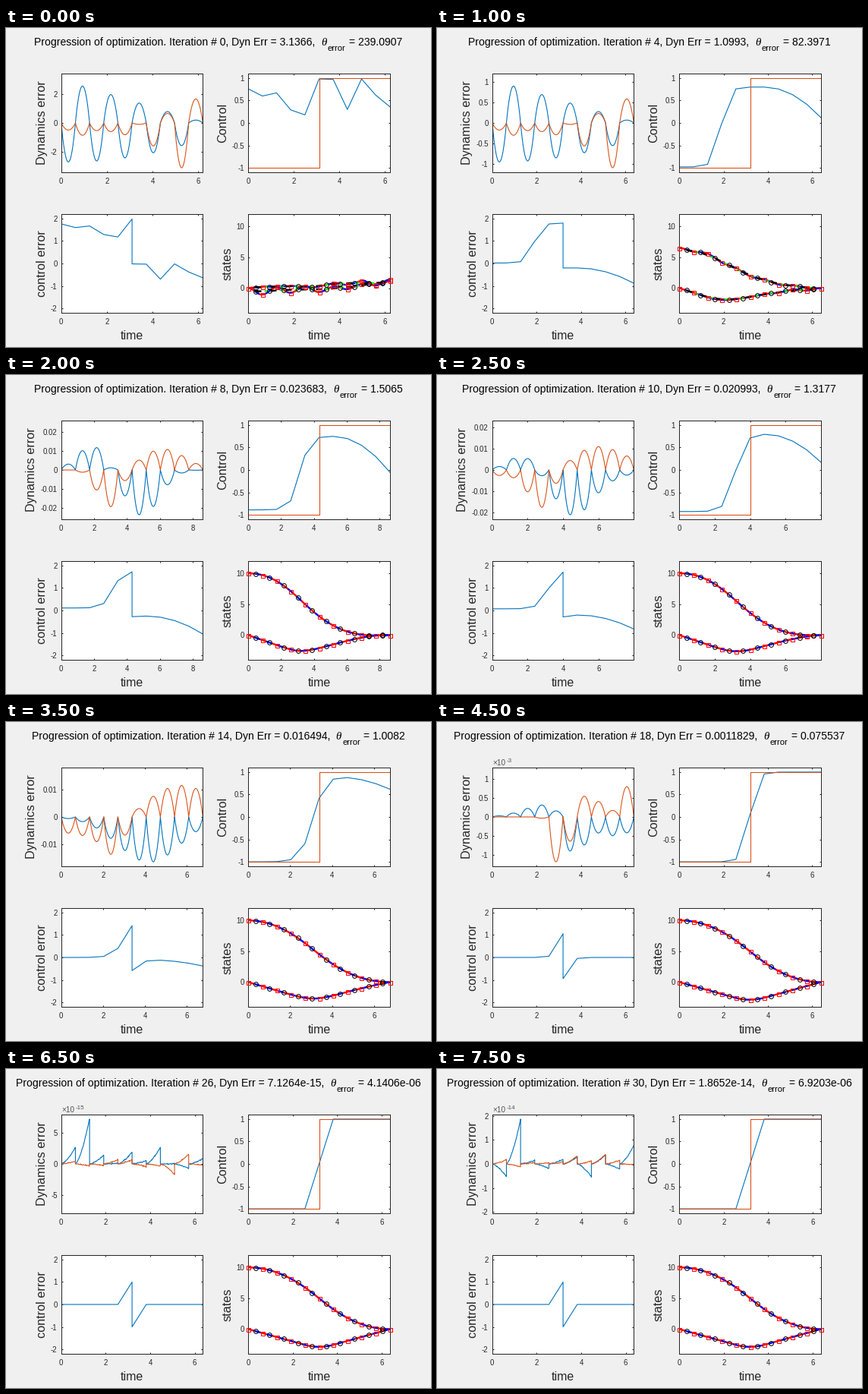
These frames come from a looping animation (560x420 px, 8 s). A matplotlib script:

```python
import numpy as np
import matplotlib.pyplot as plt
from matplotlib.animation import FuncAnimation

W, H, DPI = 560, 420, 80
PX = 72 / DPI  # points per pixel
BLUE, ORANGE, INK = "#0072BD", "#D95319", "#262626"
STEPS, SEGS, SUB = 16, 10, 30

plt.rcParams.update({
    "font.family": "Liberation Sans",
    "axes.unicode_minus": False,
    "path.simplify": False,
})

# Convergence: step, dynamics error, angle error (geometric in between)
CONVERGENCE = np.array([
    (0, 3.1366, 239.0907), (2, 1.0993, 82.3971), (4, .023683, 1.5065),
    (7, .016494, 1.0082), (9, .0011829, .075537), (11, 5.6518e-8, 3.0705e-6),
    (13, 7.1264e-15, 4.1406e-6), (15, 1.8652e-14, 6.9203e-6),
])
# Smooth switch: step, final time, low, high, centre, softness, droop at the end
SWITCH = np.array([
    (2, 6.39, -.98, .8, 2.95, .28, .68), (4, 8.62, -.89, .75, 3.65, .33, .8),
    (7, 6.757, -1, .9, 4.55, .42, .28), (9, 6.39, -1, 1, 4.97, .27, 0),
    (11, 6.367, -1, 1, 5, .05, 0),
])
GUESS = np.array([.76, .6, .67, .29, .18, .98, .97, .3, .98, .62, .36])
GUESS_TIME = 6.21

U = np.linspace(0, 1, SUB + 1)
SEG = np.arange(SEGS)
GRID = (SEG[:, None] + U).ravel() / SEGS


def bumps(*specs):
    return sum(a * np.exp(-((SEG - c) / w) ** 2 / 2) for a, c, w in specs)


def first_peaks():
    even = SEG % 2 == 0
    return (np.where(even, -2.75 + .018 * SEG ** 2, 2.9 - .3 * SEG),
            np.where(even, -.5 - .0052 * SEG ** 3, -.9 + .032 * SEG ** 2))


# Error peak of each segment (position, velocity) as sums of bumps
PEAK_AT = [0, 2, 4, 7, 9, 11]
PEAKS = [
    first_peaks(),
    first_peaks(),
    (bumps((1.3, 1.7, 1), (-2.4, 5.2, 1.2)),
     bumps((-2, 2.9, .8), (1.1, 6.7, 1.5))),
    (bumps((-1.65, 5.7, 2.2)),
     bumps((-.65, .7, 1.6), (-1.25, 3.2, .85), (1.15, 8, 2.2))),
    (bumps((.33, 3.3, 1.5), (-1.1, 5.3, .6), (-.5, 8, 1.7)),
     bumps((-1.65, 4.4, .5), (.6, 6.3, .8), (.8, 9, .5))),
    (bumps((.4, 2.3, 1), (-5.35, 5, .4)),
     bumps((-5.65, 4, .4), (5.65, 6, .4))),
]
PEAKS = np.array([np.array(p) / np.abs(p).max() for p in PEAKS])


def track(table, k):
    return [np.interp(k, table[:, 0], col) for col in table[:, 1:].T]


def integrate(t, f, start):
    return start + np.append(0, np.cumsum(np.diff(t) * (f[1:] + f[:-1]) / 2))


def error_curves(k, size):
    if k < 13:
        peaks = [[np.interp(k, PEAK_AT, col) for col in part.T]
                 for part in PEAKS.transpose(1, 0, 2)]
        pair = np.array([np.outer(p, 4 * U * (1 - U)).ravel() for p in peaks])
    else:  # rounding noise drifts within each segment
        rng = np.random.default_rng(k)
        ends = rng.normal(0, 1, (2, SEGS)) * [[.2], [.13]]
        ends[0, 1] = 1
        curve = ends[:, :, None] * U ** 1.5
        pair = (curve + rng.normal(0, .006, curve.shape)).reshape(2, -1)
    return pair * size / np.abs(pair).max()


def control(k):
    tf, low, high, centre, soft, droop = track(SWITCH, k)
    i = np.arange(SEGS + 1)
    u = low + (high - low) / (1 + np.exp((centre - i) / soft))
    u -= droop * (np.maximum(i - 6, 0) / 4) ** 2
    mix = min(k / 2, 1)
    return GUESS_TIME + mix * (tf - GUESS_TIME), GUESS + mix * (u - GUESS)


def solve(k, size):
    tf, knots = control(k)
    t = GRID * tf
    e_pos, e_vel = error_curves(k, size)
    u = np.interp(GRID, np.linspace(0, 1, SEGS + 1), knots)
    settle = min(k / 2, 1) * GRID  # pulls the end state to rest
    v = integrate(t, u + e_vel, 0)
    v -= v[-1] * settle
    x = integrate(t, v + e_pos, np.interp(k, [0, 2, 4], [0, 6.5, 10]))
    x -= x[-1] * settle
    return tf, t, e_pos, e_vel, knots, x, v


fig = plt.figure(figsize=(W / DPI, H / DPI), dpi=DPI, facecolor="#F0F0F0")


def panel(left, top):
    return fig.add_axes([left / W, 1 - (top + 130) / H, 186.6 / W, 130 / H])


ax_err, ax_ctl, ax_dif, ax_sta = [panel(x, y) for y in (60, 245) for x in (72.8, 319.2)]
texts = []


def write(x, y, s, size, color=INK, **kw):
    item = fig.text(x / W, 1 - y / H, s, fontsize=size * PX, color=color, **kw)
    texts.append(item)
    return item


def text_width(s, size):
    return size * sum({"-": .333, ".": .278}.get(c, .556) for c in s)


def number(v):
    digits = max(int(np.floor(np.log10(v))) + 5, 5)
    return f"{v:.{digits}g}"


def dress(ax, tf, lim, ticks, name, unit=1.0, foot=False):
    box = ax.get_position()
    left, mid = box.x0 * W, H * (1 - (box.y0 + box.y1) / 2)
    labels = [f"{round(v / unit, 6) + 0:g}" for v in ticks]
    times = np.arange(0, tf, 2)
    ax.set_xlim(0, tf)
    ax.set_ylim(*lim)
    ax.set_xticks(times, [f"{v:g}" for v in times])
    ax.set_yticks(ticks, labels)
    ax.tick_params(direction="in", top=True, right=True, length=2 * PX,
                   width=PX, color=INK, labelcolor=INK, labelsize=9.6 * PX)
    ax.tick_params(axis="x", pad=7.5 * PX)
    ax.tick_params(axis="y", pad=5.2 * PX)
    for side in ax.spines.values():
        side.set(linewidth=PX, color=INK)
    widest = max(text_width(s, 10) for s in labels)
    write(left - 11.6 - widest, mid, name, 16.3, rotation=90,
          rotation_mode="anchor", ha="center", va="baseline")
    if foot:
        write(left + 93.5, 410, "time", 16, ha="center", va="baseline")


def error_ticks(lim):
    decade = np.floor(np.log10(lim))
    steps = [m * 10 ** (decade + d) for d in (-1, 0) for m in (1, 2, 5)]
    step = next(s for s in steps if lim / s < 3)
    n = int(lim / step)
    ticks = step * np.arange(-n, n + 1)
    exp = int(np.floor(np.log10(ticks[-1]) + 1e-9)) if lim < .01 else 0
    return ticks, exp


def heading(k, err, theta):
    lead = f"Progression of optimization. Iteration # {2 * k}, Dyn Err = {number(err)},"
    serif = {"family": "Liberation Serif", "style": "italic"}
    # text, size, baseline, gap after it, font
    parts = [(lead, 14, 23, 7.8, {}), ("θ", 15, 23, 1, serif),
             ("error", 11.2, 30, 4.5, {}), (f"= {number(theta)}", 14, 23, 0, {})]
    items = [write(0, y, s, size, "black", va="baseline", **kw)
             for s, size, y, _, kw in parts]
    widths = [i.get_window_extent().width * W / fig.bbox.width for i in items]
    x = 279.8 - (sum(widths) + sum(p[3] for p in parts)) / 2
    for item, w, part in zip(items, widths, parts):
        item.set_x(x / W)
        x += w + part[3]


def dashed(x, y, color, width, on, off, shift):
    ax_sta.plot(x, y, color=color, lw=width * PX, dash_capstyle="butt",
                linestyle=(shift / width, (on / width, off / width)))


def draw_states(k, t, curves):
    ends = SEG * (SUB + 1)
    nodes = np.append(ends, len(t) - 1)
    mids = ends + SUB // 2
    for y in curves:
        ax_sta.plot(t, y, color=BLUE, lw=PX)
        dashed(t, y, "blue", 2.4, 8, 8, 7)
        dashed(t, y, "red", 2.4, 8, 8, 15)
        if k < 3:  # rough iterates still show their chords
            chord = (y[nodes[1:]] + y[nodes[:-1]]) / 2
            dashed(t[mids], chord, "lime", 2, 5, 15, 8)
            dashed(t[mids], chord, "black", 2.4, 8, 12, 0)
    mark = dict(ls="", mfc="none", mew=PX, clip_on=False, zorder=5)
    for y in curves:
        ax_sta.plot(t[mids], y[mids], "o", mec="black", ms=5.8 * PX, **mark)
        ax_sta.plot(t[nodes], y[nodes], "s", mec="red", ms=5 * PX, **mark)


def draw(k):
    while texts:
        texts.pop().remove()
    for ax in fig.axes:
        ax.clear()
    err, theta = np.exp(track(np.column_stack(
        [CONVERGENCE[:, 0], np.log(CONVERGENCE[:, 1:])]), k))
    tf, t, e_pos, e_vel, knots, x, v = solve(k, err)
    half = tf / 2
    thin = dict(lw=1.1 * PX)

    ax_err.plot(t, e_pos, color=BLUE, **thin)
    ax_err.plot(t, e_vel, color=ORANGE, **thin)
    lim = 1.1 * err
    ticks, exp = error_ticks(lim)
    dress(ax_err, tf, (-lim, lim), ticks, "Dynamics error", 10.0 ** exp)
    if exp:
        write(73.5, 57, "×10", 10, "#555555", va="baseline")
        write(91.5, 53, str(exp), 8, "#555555", va="baseline")

    tk = np.linspace(0, tf, SEGS + 1)
    ax_ctl.plot(tk, knots, color=BLUE, **thin)
    ax_ctl.plot([0, half, half, tf], [-1, -1, 1, 1], color=ORANGE, **thin)
    dress(ax_ctl, tf, (-1.1, 1.1), np.arange(-1, 1.1, .5), "Control")

    m = SEGS // 2
    ax_dif.plot(np.insert(tk, m, half),
                np.concatenate([knots[:m + 1] + 1, knots[m:] - 1]),
                color=BLUE, **thin)
    dress(ax_dif, tf, (-2.2, 2.2), np.arange(-2, 3), "control error", foot=True)

    draw_states(k, t, (x, v))
    dress(ax_sta, tf, (-4, 12), [0, 5, 10], "states", foot=True)
    heading(k, err, theta)
    return []


anim = FuncAnimation(fig, draw, frames=STEPS, init_func=lambda: [],
                     interval=500, repeat=True, repeat_delay=0, blit=False)
plt.show()
```
